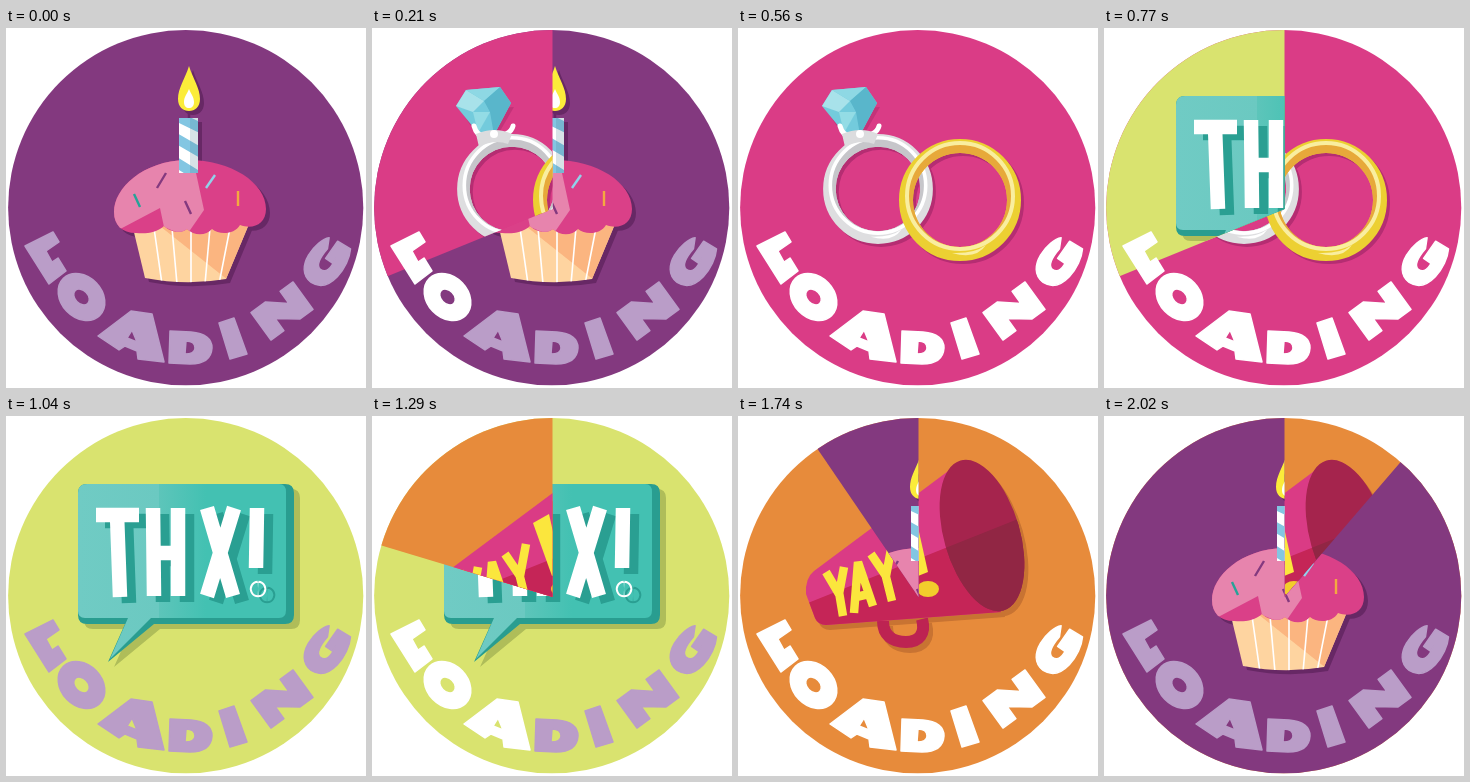
An HTML page for the animation above (2.09 s loop, 360 by 360 pixels).

```html
<!DOCTYPE html>
<html lang="en">
<head>
<meta charset="utf-8">
<title>Loading</title>
<style>
  html, body { margin: 0; width: 100%; height: 100%; overflow: hidden; background: #fff; }
  svg { display: block; width: 100vw; height: 100vh; }
  .loading { stroke-width: 1.5; stroke-linejoin: round; fill-rule: evenodd; }
  .gold { --body: #ecd032; --wall: #e7a93a; --rim: #f9ee9f; }
  .silver { --body: #dedee0; --wall: #c6c6ca; --rim: #fff; }
</style>
</head>
<body>
<svg viewBox="0 0 360 360">
  <defs>
    <clipPath id="disc"><circle cx="179.7" cy="179.7" r="177.6"/></clipPath>
    <clipPath id="sector"><path/></clipPath>
    <linearGradient id="teal" gradientUnits="userSpaceOnUse" x1="72" x2="200" y1="0" y2="0">
      <stop stop-color="#70cbc4"/><stop offset=".63" stop-color="#6bc9c1"/>
      <stop offset=".63" stop-color="#5dc5ba"/><stop offset="1" stop-color="#43c1b2"/>
    </linearGradient>
    <path id="frosting" d="M108 184C108 160 137 133 180 132C223 131 260 154 260 181C260 196 247 202 234 197C228 207 213 207 206 201C200 208 188 208 181 201C175 206 164 204 158 198C150 205 140 206 130 205C116 205 108 197 108 184Z"/>
    <path id="wrapper" d="M126 196H243L220 251Q180 258 139 250Z"/>
    <path id="flame" d="M183 38C187 51 194 60 194 71C194 79 189 83 183 83C177 83 172 79 172 71C172 60 179 51 183 38Z"/>
    <circle id="hoop" r="54" fill="none" stroke-width="14"/>
    <g id="band">
      <use href="#hoop" style="stroke:var(--body)"/>
      <path fill-rule="evenodd" style="fill:var(--wall)" d="M-52 -4a52 52 0 1 0 104 0a52 52 0 1 0 -104 0ZM-47 0a47 47 0 1 0 94 0a47 47 0 1 0 -94 0Z"/>
      <circle cy="-4" r="53" fill="none" stroke-width="4" style="stroke:var(--rim)"/>
      <path style="fill:var(--rim)" d="M-8 53Q14 54 26 45Q16 60 -8 53Z"/>
    </g>
    <path id="bubble" d="M81 68H279Q288 68 288 77V199Q288 208 279 208H148L102 246L119 208H81Q72 208 72 199V77Q72 68 81 68Z"/>
    <path id="thx" d="M90 99H133M111 99L114 181M147 92L148 180M172 92V180M147 137H172M201 92L227 180M228 92L201 180M251 92L250 152M252 172a1 1 0 1 0 .1 0"/>
    <path id="cone" d="M225 44L76 155Q67 162 68 178L77 202Q80 209 88 209L263 196Z"/>
    <path id="handle" d="M145 205C145 219 154 226 168 226C181 226 188 218 184 203"/>
    <clipPath id="frostingClip"><use href="#frosting"/></clipPath>
    <clipPath id="wrapperClip"><use href="#wrapper"/></clipPath>
    <clipPath id="candleClip"><path d="M173 90H192V145H173Z"/></clipPath>
    <clipPath id="coneClip"><use href="#cone"/></clipPath>
    <clipPath id="bellClip"><ellipse id="bell" cx="244" cy="119.5" rx="38" ry="78" transform="rotate(-16 244 119.5)"/></clipPath>

    <g id="cupcake">
      <path fill="#83397f" d="M0 0H360V360H0Z"/>
      <g fill="#672865" transform="translate(4 4)">
        <use href="#wrapper"/><use href="#frosting"/><use href="#flame"/>
        <path d="M173 90H192V145H173Z"/>
      </g>
      <use href="#wrapper" fill="#fed4a0"/>
      <g clip-path="url(#wrapperClip)">
        <path fill="#fbb580" d="M150 195H250V260H232Z"/>
        <path stroke="#fff" stroke-width="1.6" d="M148 200L156 256M166 200L171 256M185 200V256M204 200L199 256M224 200L213 256"/>
      </g>
      <use href="#frosting" fill="#da4088"/>
      <path clip-path="url(#frostingClip)" fill="#e784ad" d="M100 120H181L190 145L198 182L180 208L158 199L154 180L118 199L100 208Z"/>
      <g stroke-width="2.4">
        <path stroke="#84397f" d="M151 160L160 145M179 173L185 186"/>
        <path stroke="#27a298" d="M128 166L134 179"/>
        <path stroke="#91d2ea" d="M200 160L209 147"/>
        <path stroke="#f4a940" d="M232 163V178"/>
      </g>
      <path stroke="#672865" stroke-width="2.5" d="M183 82V92"/>
      <g clip-path="url(#candleClip)">
        <path fill="#fff" d="M170 90H195V148H170Z"/>
        <path stroke="#83c6e2" stroke-width="10" d="M168 87L197 101M168 109L197 126M168 133L197 151"/>
        <path fill="#4f8194" opacity=".22" d="M184 90H192V145H184Z"/>
      </g>
      <use href="#flame" fill="#fbec3a"/>
      <path fill="#fff" d="M183 61C185 66 188 69 188 74C188 78 186 80 183 80C180 80 178 78 178 74C178 69 181 66 183 61Z"/>
    </g>

    <g id="rings">
      <path fill="#da3c86" d="M0 0H360V360H0Z"/>
      <g stroke="#b52d72">
        <use href="#hoop" transform="translate(143 164) scale(.9)"/>
        <use href="#hoop" transform="translate(225 175)"/>
      </g>
      <use class="silver" href="#band" transform="translate(140 161) scale(.9)"/>
      <path fill="#b52d72" opacity=".6" d="M88 82L108 111L124 110L142 79Z"/>
      <path fill="#73cbdc" d="M84 78L94 62L128 59L139 75L122 107L106 105Z"/>
      <path fill="#a8e2ea" d="M84 78L94 62L112 73L101 84Z"/>
      <path fill="#8ed8e4" d="M94 62L128 59L112 73Z"/>
      <path fill="#59b6cb" d="M139 75L122 107L118 84L112 73L128 59Z"/>
      <path fill="#93dce5" d="M101 84L118 84L106 105Z"/>
      <path fill="none" stroke="#fff" stroke-width="5" stroke-linecap="round" d="M102 98Q105 109 114 108Q119 105 122 105Q127 111 134 106Q140 103 141 98"/>
      <path fill="#dcdcde" d="M104 106Q123 98 140 106L136 116Q122 111 107 119Z"/>
      <circle cx="122" cy="106" r="4" fill="#fff"/>
      <use class="gold" href="#band" transform="translate(222 172)"/>
    </g>

    <g id="thanks">
      <path fill="#d9e36f" d="M0 0H360V360H0Z"/>
      <use href="#bubble" fill="#afbd59" transform="translate(6 5)"/>
      <use href="#bubble" fill="#299d90"/>
      <path fill="url(#teal)" d="M81 68H273Q280 68 280 76V194Q280 202 273 202H145L104 243L122 202H79Q72 202 72 195V77Q72 68 81 68Z"/>
      <g role="img" aria-label="THX!" fill="none" stroke-width="14.5">
        <use href="#thx" stroke="#2a9f92" transform="translate(9 6)"/>
        <use href="#thx" stroke="#fff"/>
      </g>
    </g>

    <g id="cheer">
      <path fill="#e78b3b" d="M0 0H360V360H0Z"/>
      <g fill="#c87332" transform="translate(4 5)">
        <use href="#cone"/><use href="#bell"/>
        <use href="#handle" fill="none" stroke="#c87332" stroke-width="12"/>
      </g>
      <use href="#handle" fill="none" stroke="#bd2352" stroke-width="12"/>
      <use href="#cone" fill="#da3b85"/>
      <path clip-path="url(#coneClip)" fill="#c52557" d="M60 191L280 103V220H60Z"/>
      <use href="#bell" fill="#a5244d"/>
      <path clip-path="url(#bellClip)" fill="#912644" d="M190 139L300 95V210H190Z"/>
      <g role="img" aria-label="YAY!" fill="none" stroke="#fbe63d" stroke-width="8.5">
        <path d="M88 156L101 178L106 151M101 176L105 200M116 197L120 146L135 190M118 181L131 178M133 138L148 160L154 128M147 157L154 185"/>
        <path fill="#fbe63d" stroke="none" d="M161 107L177 98L190 156L180 160Z"/>
        <ellipse cx="190" cy="173" rx="11" ry="8" fill="#f2cd2c" stroke="none"/>
      </g>
    </g>
  </defs>

  <g clip-path="url(#disc)">
    <use id="below"/>
    <use id="above" clip-path="url(#sector)"/>
  </g>
  <g class="loading" role="img" aria-label="LOADING">
    <path d="M19 218L47 204L53 214L40 223L46 234L52 230L60 243L43 256Z"/>
    <path transform="translate(75.5 269) rotate(46)" d="M-26 0a26 20.5 0 1 0 52 0a26 20.5 0 1 0 -52 0ZM-9 0a9 6.5 0 1 0 18 0a9 6.5 0 1 0 -18 0Z"/>
    <path d="M92 308L125 283L146 286L158 334L132 331L131 323L119 318L113 322ZM126 302L131 314L121 310Z"/>
    <path d="M164 303L185 304Q206 306 206 320Q205 336 184 336L163 335ZM180 313Q189 313 189 320Q189 326 179 326Z"/>
    <path d="M213 295L228 290L241 326L224 331Z"/>
    <path transform="translate(276 283) rotate(-36)" d="M-26 -17H-8L10 -2V-17H26V17H10L-10 2V17H-26Z"/>
    <path transform="translate(319.5 234) rotate(-55)" d="M22 -11C14 -20 -24 -24 -25 0C-24 22 10 22 25 13L24 -2H3V6H9Q-9 10 -9 0Q-8 -8 12 -6Z"/>
  </g>
</svg>
<script>
  const LOOP = 2090, CX = 180.5, CY = 181;
  const LILAC = "#ba9dc8", WHITE = "#fff";
  const scenes = ["cupcake", "rings", "thanks", "cheer"];

  // tick: sweep position at the first step; gain: ticks per step
  const wipes = [
    { start: 140, end: 490, step: 70, tick: 2, gain: 2 },
    { start: 700, end: 1040, step: 70, tick: 2, gain: 2 },
    { start: 1230, end: 1530, step: 30, tick: 1, gain: 1 },
    { start: 1740, end: LOOP, step: 70, tick: 2, gain: 2 }
  ];
  const sweepKeys = [[0, 0], [2, 34.3], [4, 112.2], [8, 236.2], [10, 319.3], [12, 359.9]];

  // Letters turn white one by one, then all go back together
  const fills = [
    { start: 140, step: 70, reset: 910 },
    { start: 1140, step: 60, reset: 1950 }
  ];

  const letters = document.querySelectorAll(".loading path");
  const below = document.getElementById("below");
  const above = document.getElementById("above");
  const sector = document.querySelector("#sector path");

  function sweepAt(tick) {
    const i = sweepKeys.findIndex(key => key[0] >= tick);
    if (i < 0) return 359.9;
    if (i === 0) return 0;
    const [k0, a0] = sweepKeys[i - 1], [k1, a1] = sweepKeys[i];
    return a0 + (a1 - a0) * (tick - k0) / (k1 - k0);
  }

  // Pie slice running anticlockwise from twelve o'clock
  function slice(deg) {
    const a = deg * Math.PI / 180, r = 300;
    const x = CX - r * Math.sin(a), y = CY - r * Math.cos(a);
    return `M${CX} ${CY}V${CY - r}A${r} ${r} 0 ${deg > 180 ? 1 : 0} 0 ${x} ${y}Z`;
  }

  function draw(t) {
    const scene = wipes.filter(w => t >= w.end).length;
    const wipe = wipes[scene];
    below.setAttribute("href", "#" + scenes[scene]);
    above.setAttribute("href", "#" + scenes[(scene + 1) % scenes.length]);
    const wiping = t >= wipe.start;
    above.style.display = wiping ? "" : "none";
    if (wiping) {
      const tick = wipe.tick + wipe.gain * Math.floor((t - wipe.start) / wipe.step);
      sector.setAttribute("d", slice(sweepAt(tick)));
    }

    const fill = fills.find(f => t >= f.start && t < f.reset);
    const lit = fill ? Math.floor((t - fill.start) / fill.step) + 1 : 0;
    letters.forEach((el, i) => {
      const color = i < lit ? WHITE : LILAC;
      el.setAttribute("fill", color);
      el.setAttribute("stroke", color);
    });
  }

  const begin = performance.now();
  function frame() {
    draw((performance.now() - begin) % LOOP);
    requestAnimationFrame(frame);
  }
  frame();
</script>
</body>
</html>
```
